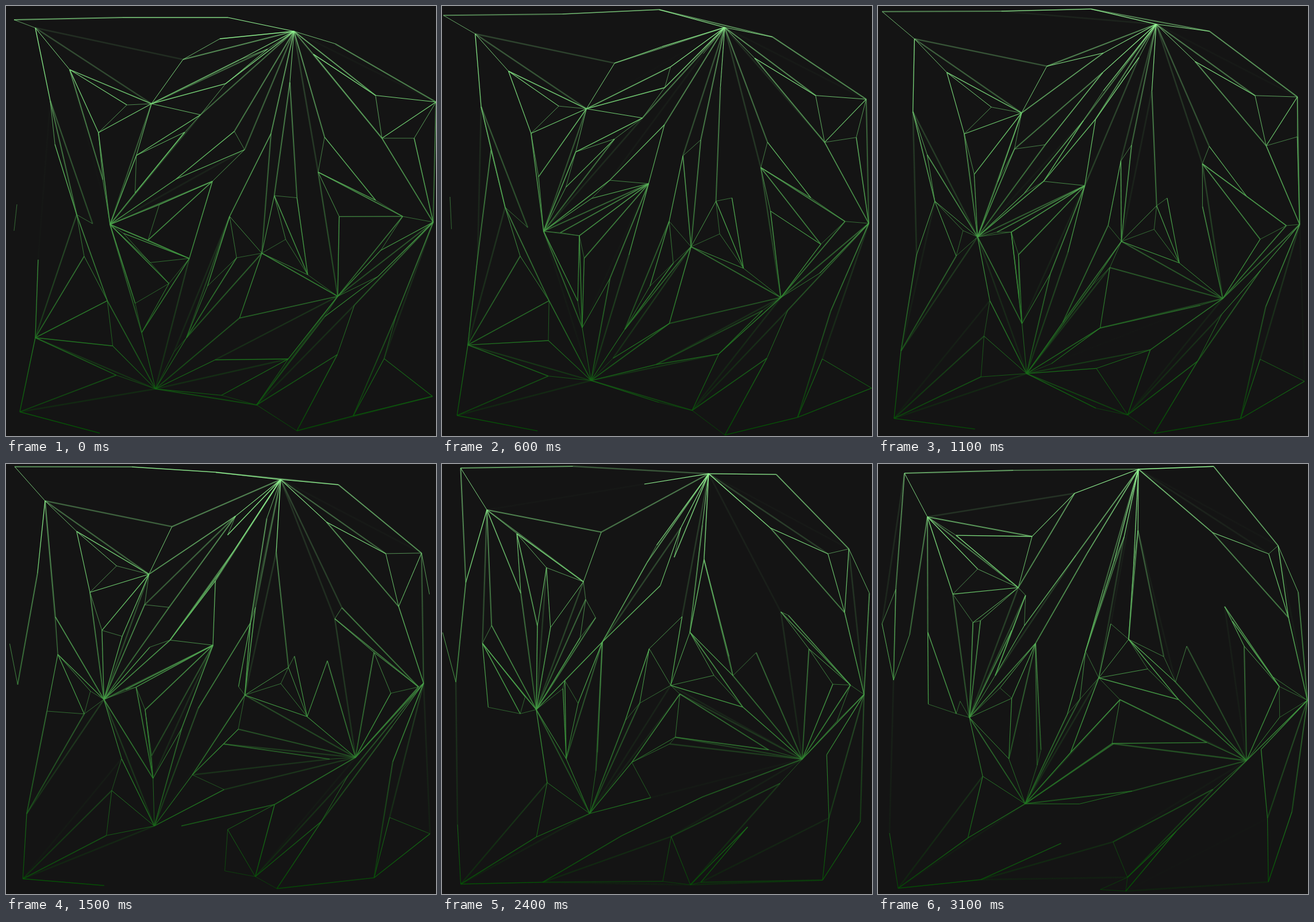
These frames come from a looping animation (748x748 px, 3200 ms). An HTML page with a canvas:

```html
<!DOCTYPE html>
<html lang="en">
<head>
<meta charset="utf-8">
<title>Drifting network</title>
<style>
  html, body { margin: 0; width: 100%; height: 100%; overflow: hidden; background: #141414; }
  canvas { display: block; width: 100vmin; height: 100vmin; }
</style>
</head>
<body>
<canvas width="748" height="748"></canvas>
<script>
const SIZE = 748, STEPS = 32, STEP_MS = 100, REACH = 280, FILLERS = 50;
const ctx = document.querySelector('canvas').getContext('2d');

// Main points as x, y and the drift over one loop; earlier points collect more edges.
const points = [
  [501, 44, -48, -35], [51, 38, 35, 54], [181, 380, -22, 61], [260, 666, -4, -75],
  [445, 430, -61, -58], [577, 505, 64, 11], [24, 706, 11, 32], [743, 376, 55, 11],
  [690, 366, 57, 45], [14, 391, 13, -15], [253, 170, -9, 45], [543, 289, 60, -41],
  [436, 694, -5, 49], [506, 739, -72, 38], [604, 713, 75, 14], [742, 679, 34, -74],
  [654, 230, 60, 37], [748, 167, -52, -25], [14, 24, -60, -40], [386, 20, -44, -71],
  [203, 20, 32, -31], [643, 338, -6, -21], [415, 250, 21, 55], [359, 305, 2, 21],
  [296, 301, -22, 11], [389, 366, 32, 44], [314, 577, 21, -75], [51, 577, -31, 65],
  [163, 743, 16, -20], [19, 345, -26, -67], [77, 165, -46, 53], [308, 93, -40, 33],
  [123, 363, -68, -66], [710, 230, 55, -7], [372, 57, 56, 70], [461, 222, -56, 56],
  [491, 614, -49, -45]
];

let seed = 41;
const random = () => (seed = (seed * 16807) % 2147483647) / 2147483647;
const distance = (a, b) => Math.hypot(a[0] - b[0], a[1] - b[1]);
const gapAround = p => Math.min(...points.map(q => distance(p, q)));

function randomPoint() {
  const u = random() * 2 - 1, v = random() * 2 - 1;
  if (u ** 4 + v ** 4 > 0.55) return randomPoint();
  return [(u + 1) * SIZE / 2, (v + 1) * SIZE / 2, random() * 130 - 65, random() * 130 - 65];
}

// Fillers settle in the gaps: the loneliest of a few candidates wins.
for (let i = 0; i < FILLERS; i++) {
  const candidates = Array.from({ length: 4 }, randomPoint);
  points.push(candidates.reduce((a, b) => gapAround(a) > gapAround(b) ? a : b));
}

function bounce(v) {
  v = Math.abs(v);
  return v > SIZE ? 2 * SIZE - v : v;
}

const side = (a, b, c) => (b[0] - a[0]) * (c[1] - a[1]) - (b[1] - a[1]) * (c[0] - a[0]);

function crosses(a, b, c, d) {
  if (a === c || a === d || b === c || b === d) return false;
  return side(a, b, c) * side(a, b, d) < 0 && side(c, d, a) * side(c, d, b) < 0;
}

// Each point joins every earlier point it can see past the existing edges.
function connect(nodes) {
  const edges = [];
  nodes.forEach((a, i) => {
    for (const b of nodes.slice(0, i)) {
      if (!edges.some(([c, d]) => crosses(a, b, c, d))) edges.push([a, b]);
    }
  });
  return edges;
}

const green = ctx.createLinearGradient(0, 0, 0, SIZE);
green.addColorStop(0, 'rgb(152, 251, 152)');
green.addColorStop(1, 'rgb(0, 80, 0)');

function draw(step) {
  const progress = step / (STEPS - 1);
  const nodes = points.map(([x, y, dx, dy]) => [bounce(x + dx * progress), bounce(y + dy * progress)]);
  ctx.globalAlpha = 1;
  ctx.fillStyle = '#141414';
  ctx.fillRect(0, 0, SIZE, SIZE);
  ctx.strokeStyle = green;
  for (const [a, b] of connect(nodes)) {
    const length = distance(a, b);
    if (length >= REACH) continue;
    ctx.globalAlpha = Math.min(1, (REACH - length) / 150);
    ctx.lineWidth = Math.max(0.6, length / 100);
    ctx.beginPath();
    ctx.moveTo(...a);
    ctx.lineTo(...b);
    ctx.stroke();
  }
}

let shown = -1;
function tick() {
  const step = Math.floor(performance.now() / STEP_MS) % STEPS;
  if (step !== shown) draw(shown = step);
  requestAnimationFrame(tick);
}
tick();
</script>
</body>
</html>
```
